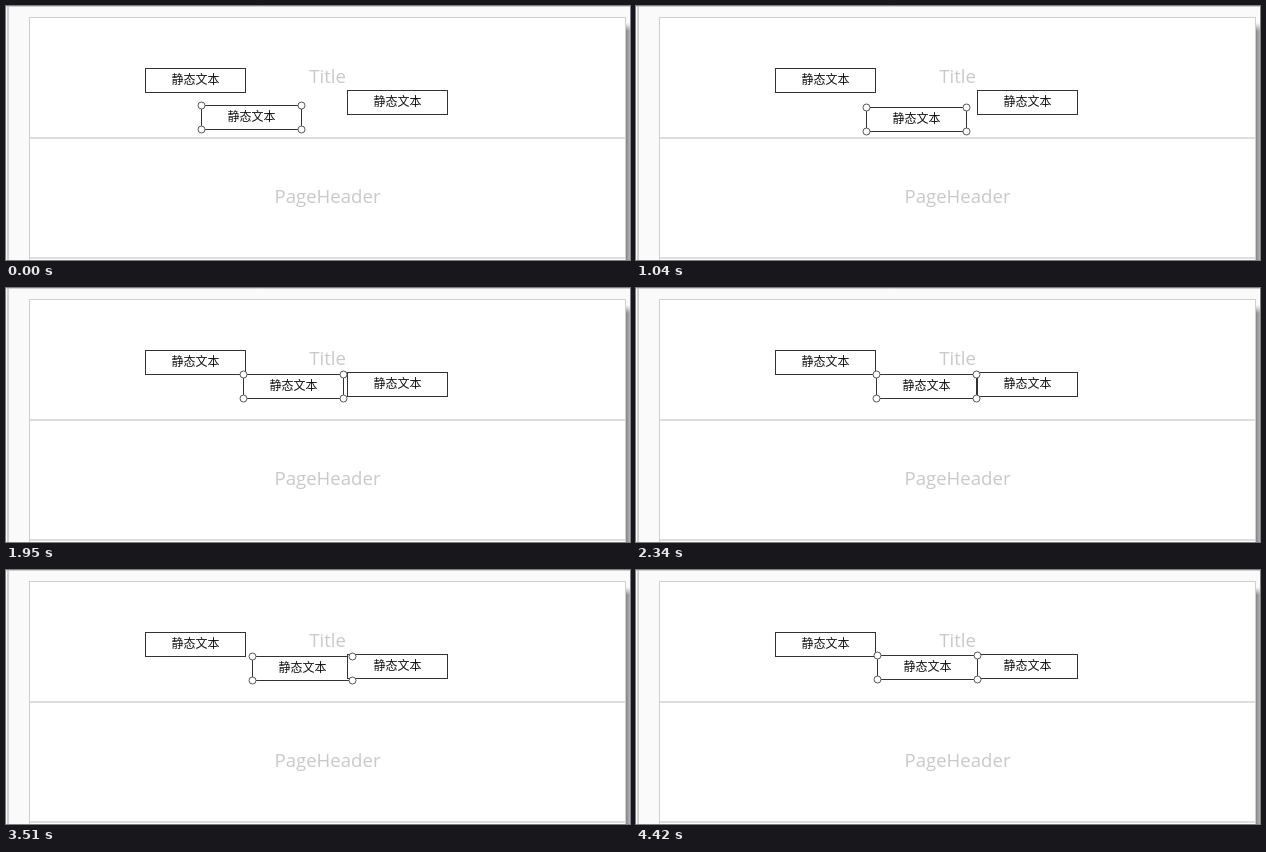
An HTML page for the animation above (5.46 s loop, 624 by 254 pixels).

```html
<!DOCTYPE html>
<html lang="zh-CN">
<head>
<meta charset="utf-8">
<title>Report designer</title>
<style>
  html, body { margin: 0; width: 100%; height: 100%; overflow: hidden; background: #fafafa; }
  svg { display: block; width: 624px; height: 254px; }
  .band { font: 18.6px "Open Sans", "Noto Sans", sans-serif; fill: #c9c9c9; text-anchor: middle; }
  .label { font: 12px "Noto Sans CJK SC", "Noto Sans CJK", sans-serif; fill: #111; text-anchor: middle; }
  .frame { fill: #fff; stroke: #333; }
  .handles { fill: #fff; stroke: #555; }
  .rule { stroke: #d2d2d2; stroke-width: 1.6; }
  .guide { stroke: #83d283; opacity: 0; }

  .drag { animation: drag 5460ms step-end infinite; }
  .low { animation: low 5460ms step-end infinite; }
  .high { animation: high 5460ms step-end infinite; }

  @keyframes drag {
    0% { transform: translate(195px, 99px); }
    14.28% { transform: translate(214px, 107px); }
    16.66% { transform: translate(223px, 104px); }
    19.04% { transform: translate(230px, 101px); }
    28.57% { transform: translate(231px, 100px); }
    30.95% { transform: translate(233px, 96px); }
    33.33% { transform: translate(235px, 91px); }
    35.71% { transform: translate(237px, 86px); }
    38.09% { transform: translate(239px, 86px); }
    40.47% { transform: translate(240px, 86px); }
    54.76% { transform: translate(246px, 90px); }
    57.14% { transform: translate(247px, 90px); }
    59.52% { transform: translate(247px, 89px); }
    61.90% { transform: translate(247px, 87px); }
    64.28% { transform: translate(246px, 86px); }
    66.66% { transform: translate(245px, 86px); }
    69.04% { transform: translate(243px, 86px); }
    71.42% { transform: translate(242px, 85px); }
    73.80%, 100% { transform: translate(241px, 85px); }
  }
  @keyframes low {
    0% { opacity: 0; }
    14.28% { opacity: 1; }
    16.66%, 100% { opacity: 0; }
  }
  @keyframes high {
    0% { opacity: 0; }
    40.47% { opacity: 1; }
    42.85% { opacity: 0; }
    73.80% { opacity: 1; }
    80.95%, 100% { opacity: 0; }
  }
</style>
</head>
<body>
<svg viewBox="0 0 624 254">
  <defs>
    <linearGradient id="shade">
      <stop offset="0" stop-color="#858585"/>
      <stop offset="1" stop-color="#b4b4b4"/>
    </linearGradient>
    <linearGradient id="fade" x2="0" y2="1">
      <stop offset="0" stop-color="#fafafa"/>
      <stop offset="1" stop-color="#fafafa" stop-opacity="0"/>
    </linearGradient>
    <g id="box">
      <rect class="frame" x=".5" y=".5" width="100" height="24"/>
      <text class="label" x="50.5" y="15.5">静态文本</text>
    </g>
  </defs>

  <rect width="624" height="254" fill="#fafafa"/>
  <path d="M0 .5H624" stroke="#d0d0d0"/>
  <path d="M2 0V254" stroke="#c6c6c6" stroke-width="1.6"/>
  <rect x="620" y="17" width="4" height="237" fill="url(#shade)"/>
  <rect x="620" y="17" width="4" height="8" fill="url(#fade)"/>

  <rect x="23.5" y="11.5" width="596" height="250" fill="#fff" stroke="#cfcfcf"/>
  <path class="rule" d="M24 132H619M24 252H619"/>
  <text class="band" x="321.5" y="77">Title</text>
  <text class="band" x="321.5" y="197">PageHeader</text>

  <use href="#box" x="139" y="62"/>
  <g class="drag"><use href="#box"/></g>
  <use href="#box" x="341" y="84"/>

  <path class="guide low" d="M214 108.5H442"/>
  <path class="guide high" d="M139 86.5H342"/>

  <g class="drag handles">
    <circle cx=".5" cy=".5" r="3.5"/>
    <circle cx="100.5" cy=".5" r="3.5"/>
    <circle cx=".5" cy="24.5" r="3.5"/>
    <circle cx="100.5" cy="24.5" r="3.5"/>
  </g>
</svg>
</body>
</html>
```
